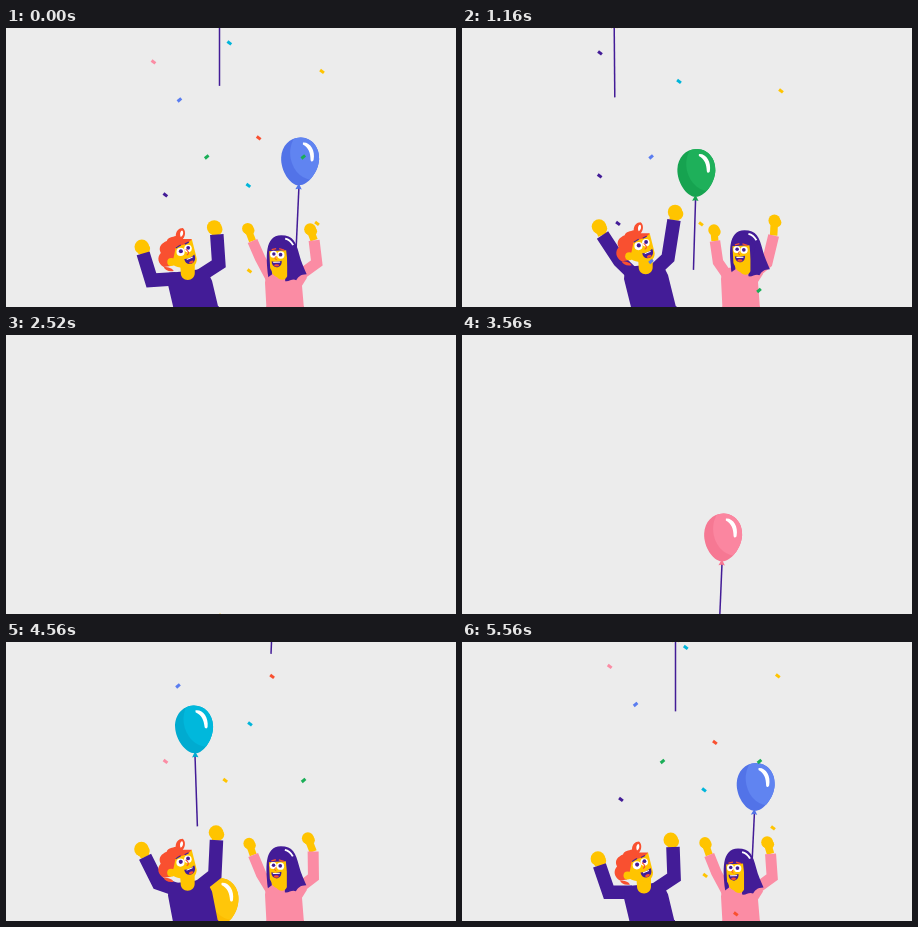
Recreate the animation shown at these times as an HTML page with a canvas. Size 450 by 279 pixels, loop 5600 ms.

```html
<!DOCTYPE html>
<html lang="en">
<head>
<meta charset="utf-8">
<title>Balloon party</title>
<style>
html, body { margin: 0; width: 100%; height: 100%; overflow: hidden; background: #ececec; }
canvas { display: block; width: 100vw; height: 100vh; }
</style>
</head>
<body>
<canvas id="stage"></canvas>
<script>
const W = 450, H = 279, LOOP = 5600, STEP = 40, TAU = Math.PI * 2;
const PURPLE = '#431c97', YELLOW = '#ffc400', RED = '#f95030', PINK = '#fb8ca4',
      GREEN = '#1aae57', CYAN = '#00b5da', BLUE = '#5a7df0';
const canvas = document.getElementById('stage');
const ctx = canvas.getContext('2d');

// Balloons leave every 600 ms: light, dark, start x, drift, string lean at start, lean change
const balloons = [
  ['#fb86a0', '#f67893', 258.2, .008, -4, 0],
  ['#00b8dc', '#00abd0', 199.6, -.0152, 3.2, 0],
  ['#ffc60a', '#fdbc00', 213.5, 0, 0, 0],
  ['#6084f1', '#5273e8', 287.5, .011, -7.2, .0049],
  ['#f75336', '#ec432d', 152, 0, .8, 0],
  ['#1eb05a', '#16a350', 225.3, .0163, -2.8, 0]
];

// Confetti: colour, start x, start time, drift
const confetti = [
  [YELLOW, 223, 3977, -.0065], [GREEN, 302, 3977, -.0076], [PINK, 160, 4057, -.001],
  [CYAN, 244, 4215, 0], [BLUE, 172, 4375, 0], [RED, 265, 4415, .0077],
  [YELLOW, 236.3, 4577, .007], [YELLOW, 311, 4777, 0], [PURPLE, 152.6, 4897, .0096],
  [CYAN, 237.8, 4937, .0068], [GREEN, 198, 5057, .005], [GREEN, 300, 5057, -.005],
  [RED, 255, 5137, -.005], [BLUE, 174.5, 5297, -.0035], [YELLOW, 315, 5417, .0055],
  [PINK, 148.2, 5457, -.005], [CYAN, 224, 5537, -.0104], [GREEN, 297, 5655, 0],
  [BLUE, 189, 5777, 0], [PURPLE, 156, 5937, 0], [YELLOW, 239, 5935, 0],
  [PURPLE, 141, 6137, -.0054], [BLUE, 185, 6217, .0076], [YELLOW, 319, 6495, 0],
  [CYAN, 217, 6535, 0], [PURPLE, 138, 6655, 0], [YELLOW, 224.4, 6937, -.008]
];

const clamp = v => Math.max(0, Math.min(1, v));

function fill(path, color) {
  ctx.fillStyle = color;
  ctx.fill(new Path2D(path));
}

function stroke(path, color, width) {
  ctx.strokeStyle = color;
  ctx.lineWidth = width;
  ctx.stroke(new Path2D(path));
}

function oval(x, y, rx, ry, color, angle = 0) {
  ctx.fillStyle = color;
  ctx.beginPath();
  ctx.ellipse(x, y, rx, ry, angle, 0, TAU);
  ctx.fill();
}

function line(points, color, width, cap = 'butt') {
  ctx.strokeStyle = color;
  ctx.lineWidth = width;
  ctx.lineCap = cap;
  ctx.beginPath();
  points.forEach(([x, y]) => ctx.lineTo(x, y));
  ctx.stroke();
  ctx.lineCap = 'butt';
}

function shifted(x, y, draw) {
  ctx.save();
  ctx.translate(x, y);
  draw();
  ctx.restore();
}

function arm(hand, wrist, elbow, shoulder, color, size) {
  line([hand, wrist], YELLOW, size * .68);
  oval(hand[0], hand[1], size * .54, size * .54, YELLOW);
  oval(hand[0] + 1.5, hand[1] + 2, size * .5, size * .46, YELLOW);
  line([wrist, elbow, shoulder], color, size);
}

function eye(x, y, r, px, py) {
  oval(x, y, r, r, '#fff');
  oval(x + px, y + py, r * .5, r * .5, PURPLE);
}

const egg = new Path2D('M0-24C11-24 19-15 19-3C19 10 9 24 0 24C-9 24-19 10-19-3C-19-15-11-24 0-24Z');

function drawBalloon([light, dark, x0, drift, lean, leanRate], age) {
  const y = 303 - .2875 * age;
  if (age < 0 || y < -100) return;
  const dx = lean + leanRate * age;
  shifted(x0 + drift * age, y, () => {
    const knot = dx * .25;
    line([[knot, 26], [dx, 97]], PURPLE, 1.5);
    ctx.rotate(-dx * .012);
    fill('M0 22L-3.2 28Q0 26.6 3.2 28Z', dark);
    ctx.save();
    ctx.clip(egg);
    ctx.fillStyle = dark;
    ctx.fillRect(-20, -25, 40, 50);
    oval(10, -7, 20, 25, light, -.25);
    ctx.restore();
    fill('M2-19C9-20 15-12 13.5-2C13 0 11 0 10.5-2C10-9 8-14 2-17Z', '#fff');
  });
}

function manHead() {
  fill('M174 230H189V245C189 249 186 252 182 252C178 252 175 249 175 245Z', YELLOW);
  fill('M164 226L168 219L186 211C188 219 190 226 191 231C191 237 187 240 180 240C172 240 166 238 164 232Z', YELLOW);
  fill('M158 239C152 236 151 229 155 225C152 219 156 215 161 213C162 209 167 209 170 208' +
       'C170 203 173 200 177 200C180 202 180 208 177 211L186 211C183 216 176 217 170 219' +
       'L168 229L165 238Z', RED);
  fill('M175 209C173 205 176 201 177 203C178 205 177 208 175 209Z', '#fff');
  oval(165.5, 234, 4, 4, YELLOW);
  fill('M158 239C163 239 166 240 168 243C163 244 159 242 158 239Z', RED);
  eye(174.8, 223.8, 4.1, .3, -.7);
  eye(182.2, 220.5, 3.8, .2, -.8);
  line([[170, 220], [175, 217]], PURPLE, 1.2);
  line([[179, 216], [183, 214]], PURPLE, 1.2);
  stroke('M180 221Q185 225 181 227', RED, 1.1);
  fill('M178.5 231Q184 231 188.5 226.5C191 231 188 236 184 236C181 236 179 234 178.5 231Z', PURPLE);
  oval(185.5, 234, 2.4, 1.3, RED, -.4);
  line([[181, 231.4], [187, 229]], '#fff', 1);
}

function drawMan(u, s) {
  const lift = 6 * u;
  arm([136 + s, 219.5 - 21 * u], [137 + 3.5 * u, 226 - 19 * u],
      [145 + 12.5 * u, 253 - 20 * u], [170, 251 - lift], PURPLE, 13.5);
  arm([208.3 + 3.8 * u + s, 200 - 16 * u], [211 + s, 207 - 15 * u],
      [213 - 7 * u, 236 - lift], [191, 250 - lift], PURPLE, 13.5);
  const top = 245 - lift, left = 168 + s * 1.5, right = 213 + s * 1.5;
  fill(`M163 ${top}L174 ${top - 1}L190 ${top - 3}L200 ${top - 4}L206 ${top + 8}` +
       `L${right} 281L${left} 281L162 ${top + 12}Z`, PURPLE);
  ctx.fillStyle = PURPLE;
  ctx.fillRect(left, 278, right - left, 130);
  shifted(s * 1.2 + u * .5, .3 - lift, manHead);
}

function womanHead(blink) {
  fill('M262 248C260 230 258 207 275 207C287 207 290 214 293 226C295 234 298 240 300.5 246' +
       'C294 246 292 249 290 252C286 250 283 254 279 253L279 225Z', PURPLE);
  fill('M263 222C270 221 276 221 281 221V248C279 253 273 252 271 249C267 247 265 245 264 240Z', YELLOW);
  fill('M262 223C262 213 268 209 275 209L286 223L282 240L280 222Z', PURPLE);
  fill('M262 239Q266 241 266 246L262 249Z', PURPLE);
  line([[265.5, 221.5], [270, 220.4]], RED, 1.3);
  line([[273, 220.6], [278, 222]], RED, 1.3);
  if (blink) {
    stroke('M264 227Q267 224 270 227M272 228Q275 225 278 228', PURPLE, 1.1);
  } else {
    eye(267.4, 226.2, 3.5, .3, -.3);
    eye(274.6, 226.8, 3.7, -.2, -.3);
  }
  stroke('M270 228Q267.5 231 270.5 231.5', RED, 1);
  fill('M265.5 233Q270 234.5 275.5 232.5C276 237 273 239.5 270 239C267 238.5 265.5 236 265.5 233Z', PURPLE);
  oval(270.5, 237.2, 2.5, 1.2, RED);
  line([[267, 234.2], [274, 234]], '#fff', 1);
  stroke('M279 210.5Q284 211.5 287 217', '#fff', 1.9);
}

function drawWoman(u, s, blink) {
  arm([242.5 + 5 * u + 4.5 * s, 200.5 + 1.5 * u], [247 + 3 * u + 3 * s, 213],
      [254 + 2 * u, 230 + 4 * u], [265, 251 - 4 * u], PINK, 10.5);
  arm([305.5 + 7 * s, 201.5 - 9 * u], [308.7 + 3 * s, 212.5 - 5 * u],
      [311 - 6 * u, 235], [293, 248 - 3 * u], PINK, 11);
  const top = 245 - 4 * u;
  fill(`M260 ${top + 2}Q266 ${top - 3} 275 ${top - 1}L294 ${top - 4}L301 ${top + 5}` +
       `L296 ${top + 13}L298 281L260.5 281L259 ${top + 10}Z`, PINK);
  ctx.fillStyle = PINK;
  ctx.fillRect(260.5, 278, 37.5, 130);
  shifted(1 + 2 * u + 4.5 * s, .3 - 5 * u, () => womanHead(blink));
}

// Eases a figure in from below and out again; hidden amount runs from 1 to 0 to 1
function withEntrance(T, start, end, leave, gone, dx, turn, pivot, draw) {
  const hidden = T < 6000
    ? (1 - clamp((T - start) / (end - start))) ** 2
    : clamp((T - leave) / (gone - leave)) ** 2;
  if (hidden >= 1) return;
  ctx.save();
  ctx.translate(pivot + dx * hidden, 290 + 110 * hidden);
  ctx.rotate(turn * hidden);
  ctx.translate(-pivot, -290);
  draw();
  ctx.restore();
}

function drawConfetti([color, x0, start, drift], T) {
  const age = T - start, y = .2375 * age;
  if (age < 0 || y > H + 4) return;
  shifted(x0 + drift * age, y, () => {
    ctx.rotate(color === BLUE || color === GREEN ? -.7 : .65);
    ctx.fillStyle = color;
    ctx.fillRect(-2.4, -1.5, 4.8, 3);
  });
}

function render(t) {
  const T = t < 3000 ? t + LOOP : t;
  ctx.setTransform(canvas.width / W, 0, 0, canvas.height / H, 0, 0);
  ctx.fillStyle = '#ececec';
  ctx.fillRect(0, 0, W, H);

  balloons.forEach((b, i) => drawBalloon(b, T - 3210 - 600 * i));

  const beat = (T - LOOP) / 840;
  const phase = beat + .027 + .105 * Math.sin(TAU * (beat - .15));
  const raise = .5 - .5 * Math.cos(TAU * phase);
  const sway = -Math.sin(Math.PI * beat + .2);
  withEntrance(T, 3560, 4080, 7470, 7920, 0, .7, 190, () => drawMan(raise, sway));
  withEntrance(T, 3720, 4260, 7490, 7950, -65, -.75, 278,
    () => drawWoman(raise, sway, T >= 4040 && T < 4200));

  confetti.forEach(c => drawConfetti(c, T));
}

function resize() {
  const ratio = window.devicePixelRatio || 1;
  const w = Math.round(innerWidth * ratio), h = Math.round(innerHeight * ratio);
  if (canvas.width !== w || canvas.height !== h) {
    canvas.width = w;
    canvas.height = h;
  }
}

function tick() {
  resize();
  render(Math.floor(performance.now() % LOOP / STEP) * STEP);
  requestAnimationFrame(tick);
}
tick();
</script>
</body>
</html>
```
